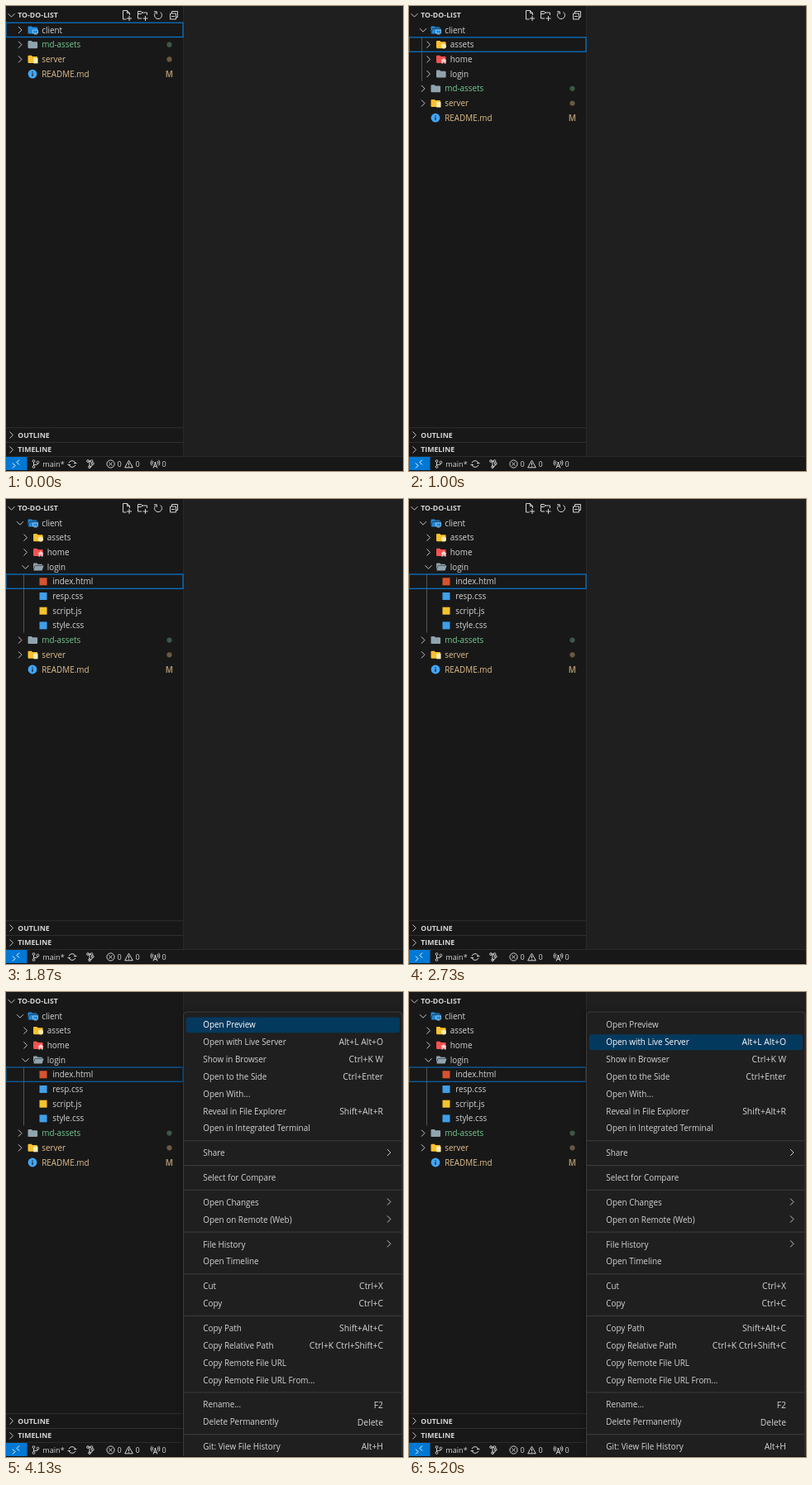
An HTML page with a canvas that plays this animation: 480 by 562 pixels, repeating every 5.79 s.

```html
<!DOCTYPE html>
<html lang="en">
<head>
<meta charset="utf-8">
<title>File tree and context menu</title>
<style>
html, body { margin: 0; width: 100%; height: 100%; overflow: hidden; background: #1f1f1f; }
canvas { display: block; }
</style>
</head>
<body>
<canvas width="480" height="562"></canvas>
<script>
const ctx = document.querySelector('canvas').getContext('2d');
const LOOP = 5790;
const OPEN_CLIENT = 670, OPEN_LOGIN = 1530, LEAVE_TREE = 3670, OPEN_MENU = 3730;
const FOCUS = [[0, 'client'], [870, 'assets'], [1130, 'home'], [1330, 'login'], [1730, 'index.html']];
const PICK = [[0, -1], [4130, 0], [4470, 1]];
const ROW = 17.7, FIRST_ROW = 29;
const FG = '#d4d4d4', GREEN = '#73c991', AMBER = '#e2c08d';

const FILES = [
  { name: 'client', depth: 0, color: '#2489d8', badge: 'client', opens: OPEN_CLIENT, from: 0 },
  { name: 'assets', depth: 1, color: '#fbc02d', badge: 'dot', opens: Infinity, from: OPEN_CLIENT },
  { name: 'home', depth: 1, color: '#f7514f', badge: 'house', opens: Infinity, from: OPEN_CLIENT },
  { name: 'login', depth: 1, color: '#90a4ae', opens: OPEN_LOGIN, from: OPEN_CLIENT },
  { name: 'index.html', depth: 2, color: '#d6532d', from: OPEN_LOGIN },
  { name: 'resp.css', depth: 2, color: '#3f9fe8', from: OPEN_LOGIN },
  { name: 'script.js', depth: 2, color: '#f5c32c', from: OPEN_LOGIN },
  { name: 'style.css', depth: 2, color: '#3f9fe8', from: OPEN_LOGIN },
  { name: 'md-assets', depth: 0, color: '#90a4ae', opens: Infinity, from: 0, text: GREEN, dot: '#3c5846' },
  { name: 'server', depth: 0, color: '#fbc02d', badge: 'list', opens: Infinity, from: 0, text: AMBER, dot: '#6a5844' },
  { name: 'README.md', depth: 0, info: true, from: 0, text: AMBER, mark: 'M' }
];

// Groups are divided by separators; '>' marks a submenu.
const MENU = [
  ['Open Preview', 'Open with Live Server|Alt+L Alt+O', 'Show in Browser|Ctrl+K W',
   'Open to the Side|Ctrl+Enter', 'Open With...', 'Reveal in File Explorer|Shift+Alt+R',
   'Open in Integrated Terminal'],
  ['Share|>'],
  ['Select for Compare'],
  ['Open Changes|>', 'Open on Remote (Web)|>'],
  ['File History|>', 'Open Timeline'],
  ['Cut|Ctrl+X', 'Copy|Ctrl+C'],
  ['Copy Path|Shift+Alt+C', 'Copy Relative Path|Ctrl+K Ctrl+Shift+C',
   'Copy Remote File URL', 'Copy Remote File URL From...'],
  ['Rename...|F2', 'Delete Permanently|Delete'],
  ['Git: View File History|Alt+H']
];

const at = (steps, t) => steps.filter(s => s[0] <= t).pop()[1];

function rect(x, y, w, h, color) {
  ctx.fillStyle = color;
  ctx.fillRect(x, y, w, h);
}

function shape(x, y, d, color, lineWidth) {
  ctx.save();
  ctx.translate(x, y);
  ctx.fillStyle = ctx.strokeStyle = color;
  ctx.lineWidth = lineWidth || 1;
  ctx.lineJoin = 'round';
  const path = new Path2D(d);
  lineWidth ? ctx.stroke(path) : ctx.fill(path);
  ctx.restore();
}

function circle(x, y, r, color, lineWidth) {
  shape(x, y, `M${r} 0A${r} ${r} 0 1 1 ${-r} 0A${r} ${r} 0 1 1 ${r} 0Z`, color, lineWidth);
}

function text(s, x, y, { size = 9.9, color = FG, weight = 400, align = 'left' } = {}) {
  ctx.font = `${weight} ${size}px "Open Sans", "Noto Sans", sans-serif`;
  ctx.textAlign = align;
  ctx.fillStyle = color;
  ctx.fillText(s, x, Math.round(y + size * 0.36));
}

function chevron(x, y, open) {
  shape(x, y, open ? 'M-4 -1.8L0 2.2L4 -1.8' : 'M-2 -4L2 0L-2 4', '#c5c5c5', 1);
}

function folder(x, y, { color, badge }, open) {
  if (open) {
    shape(x, y, 'M-6 3.5V-3.6Q-6 -4.6 -5 -4.6H-1.7L-.5 -3.4H4Q5 -3.4 5 -2.2H-3Q-4 -2.2 -4.4 -1.2Z', color);
    shape(x, y, 'M-3.8 -1.5H6.6L4.8 3.8Q4.5 4.5 3.8 4.5H-5.6Z', color);
  } else {
    shape(x, y, 'M-6 -3.6Q-6 -4.6 -5 -4.6H-1.7L-.5 -3.4H4.5Q5.6 -3.4 5.6 -2.3V3.4Q5.6 4.5 4.5 4.5H-5Q-6 4.5 -6 3.4Z', color);
  }
  if (badge === 'client') shape(x, y, 'M0 0H6V4H0ZM1.5 5H5', '#8fcaf3', 0.9);
  if (badge === 'dot') circle(x + 3, y + 1.8, 3, '#ffecb3');
  if (badge === 'house') shape(x, y, 'M3 -1.5L6.5 1.7H5.6V5H3.8V3H2.2V5H.4V1.7H-.5Z', '#ffcdd2');
  if (badge === 'list') shape(x, y, 'M.8 -1.5H6V5H.8Z', '#fff0bd');
}

function infoIcon(x, y) {
  circle(x, y, 5.4, '#42a5f5');
  rect(x - 0.6, y - 0.7, 1.2, 3.6, '#181818');
  rect(x - 0.6, y - 2.9, 1.2, 1.2, '#181818');
}

function fileRow(file, y, t) {
  const shift = file.depth * 6.5;
  const open = t >= file.opens;
  if (file.opens) {
    chevron(17 + shift, y, open);
    folder(32.5 + shift, y, file, open);
  } else if (file.info) {
    infoIcon(32, y);
  } else {
    rect(40.5, y - 4.5, 9, 9, file.color);
  }
  text(file.name, 43.2 + shift, y, { color: file.text });
  if (file.dot) circle(197.5, y, 3.1, file.dot);
  if (file.mark) text(file.mark, 197.3, y, { color: '#a58c68', weight: 700, align: 'center' });
}

function header(withActions) {
  chevron(6.5, 11, true);
  text('TO-DO-LIST', 14.2, 11, { size: 8.75, weight: 700 });
  if (!withActions) return;
  const icon = (x, d) => shape(x, 11, d, FG, 1);
  icon(146, 'M-.5 5H-4.5V-5.5H.5L3.5 -2.5V0M.5 -5.5V-2.5H3.5M3 1V7M0 4H6');
  icon(165, 'M-1 4H-5.5V-4.5H-1.5L0 -3H5.5V0M-5.5 -1.5H-1.5L0 -3M3.5 1V7M.5 4H6.5');
  icon(184, 'M-2.5 -3.6A4.5 4.5 0 1 0 2.5 -3.6M-5 -4.2H-1.7V-1');
  icon(203, 'M-2.5 -2V-4.5H4.5V2.5H2.5M-4.5 -2H2.5V5H-4.5ZM-3 1.5H1');
}

function tree(t, menuOpen) {
  const rows = FILES.filter(f => t >= f.from);
  const rowY = i => FIRST_ROW + i * ROW;
  const focus = at(FOCUS, t);
  const focusAt = rows.findIndex(f => f.name === focus);

  // Guide line of the focused branch.
  if (t >= OPEN_CLIENT) {
    const inLogin = t >= OPEN_LOGIN;
    const first = inLogin ? 4 : 1;
    const count = inLogin ? 4 : 3;
    rect(inLogin ? 21 : 15, rowY(first) - 9, 1, count * ROW, '#545454');
  }
  ctx.strokeStyle = menuOpen ? '#0a65ad' : '#0a78cf';
  ctx.lineWidth = 1.2;
  ctx.strokeRect(0, rowY(focusAt) - 8.8, 214, 17.3);
  rows.forEach((f, i) => fileRow(f, rowY(i), t));
}

function panels() {
  [['OUTLINE', 518.5], ['TIMELINE', 536.3]].forEach(([name, y]) => {
    rect(0, y - 9.3, 214, 1, '#2f2f2f');
    chevron(6.5, y, false);
    text(name, 14.2, y, { size: 8.75, weight: 700 });
  });
}

function statusBar() {
  const y = 553.5;
  const icon = (x, d) => shape(x, y, d, FG, 1);
  const label = (s, x) => text(s, x, y, { size: 9.1 });
  rect(0, 544, 480, 18, '#181818');
  rect(0, 544, 480, 1, '#2b2b2b');
  rect(0, 545, 25.5, 17, '#0078d4');
  shape(12, y, 'M-4 -1L-1 2L-4 5M4 -5L1 -2L4 1', '#ffffff', 1);
  icon(36, 'M-2.5 -2V2M-2.5 2Q-2.5 .8 0 .8H1Q2.5 .8 2.5 -.6');
  [[-2.5, -3.5], [-2.5, 3.5], [2.5, -2]].forEach(([dx, dy]) => circle(36 + dx, y + dy, 1.4, FG, 0.9));
  label('main*', 44.3);
  icon(80, 'M-4 -1A4.2 4.2 0 0 1 4 -1M4 1A4.2 4.2 0 0 1 -4 1M2 -1H5.5M-5.5 1H-2');
  icon(102, 'M-2.5 -3.5H1M-1 -3.5V3.7M-1 3.7Q2.5 3.7 2.5 0');
  [[-3, -3.5], [1.5, -3.5], [-1, 3.7], [2.8, -0.5]].forEach(([dx, dy]) => circle(102 + dx, y + dy, 1.4, FG, 0.9));
  circle(126.5, y, 4.6, FG, 1);
  icon(126.5, 'M-2 -2L2 2M2 -2L-2 2');
  label('0', 134.6);
  icon(148.5, 'M0 -4.3L4.8 4.3H-4.8ZM0 -1.5V1.5M0 2.3V3.3');
  label('0', 156.6);
  icon(180.5, 'M0 -1L-2.5 5M0 -1L2.5 5M-1.6 2.8H1.6M-2.4 .8A2.8 2.8 0 0 1 -2.4 -3.5M2.4 .8A2.8 2.8 0 0 0 2.4 -3.5M-4 2A4.8 4.8 0 0 1 -4 -4.7M4 2A4.8 4.8 0 0 0 4 -4.7');
  circle(180.5, y - 1.4, 1.1, FG);
  label('0', 188.5);
}

function menu(pick) {
  ctx.save();
  ctx.shadowColor = 'rgba(0,0,0,.45)';
  ctx.shadowBlur = 7;
  ctx.beginPath();
  ctx.roundRect(214.5, 24, 264.5, 550, 4);
  ctx.fillStyle = '#1f1f1f';
  ctx.fill();
  ctx.restore();
  ctx.strokeStyle = '#3c3c3c';
  ctx.lineWidth = 1;
  ctx.stroke();

  let y = 39.5, index = 0;
  MENU.forEach((group, g) => {
    if (g) rect(215, y - 15.4, 263.5, 1, '#3c3c3c');
    group.forEach(item => {
      const [name, key] = item.split('|');
      const active = index++ === pick;
      const color = active ? '#ffffff' : FG;
      if (active) {
        ctx.beginPath();
        ctx.roundRect(218, y - 9.1, 258, 18.9, 3);
        ctx.fillStyle = '#04395e';
        ctx.fill();
      }
      text(name, 238.3, y, { color });
      if (key === '>') chevron(463, y - 0.7, false);
      else if (key) text(key, 456, y, { color, size: 10.35, align: 'right' });
      y += 20.9;
    });
    y += 8.9;
  });
}

function draw(now) {
  const t = now % LOOP;
  const menuOpen = t >= OPEN_MENU;
  rect(0, 0, 480, 562, '#1f1f1f');
  rect(0, 0, 214, 562, '#181818');
  rect(214, 0, 1, 544, '#292929');
  header(t < LEAVE_TREE);
  tree(t, menuOpen);
  panels();
  statusBar();
  if (menuOpen) menu(at(PICK, t));
  rect(0, 561, 480, 1, '#0e0e0e');
}

const start = performance.now();
function tick() {
  draw(performance.now() - start);
  requestAnimationFrame(tick);
}
tick();
</script>
</body>
</html>
```
